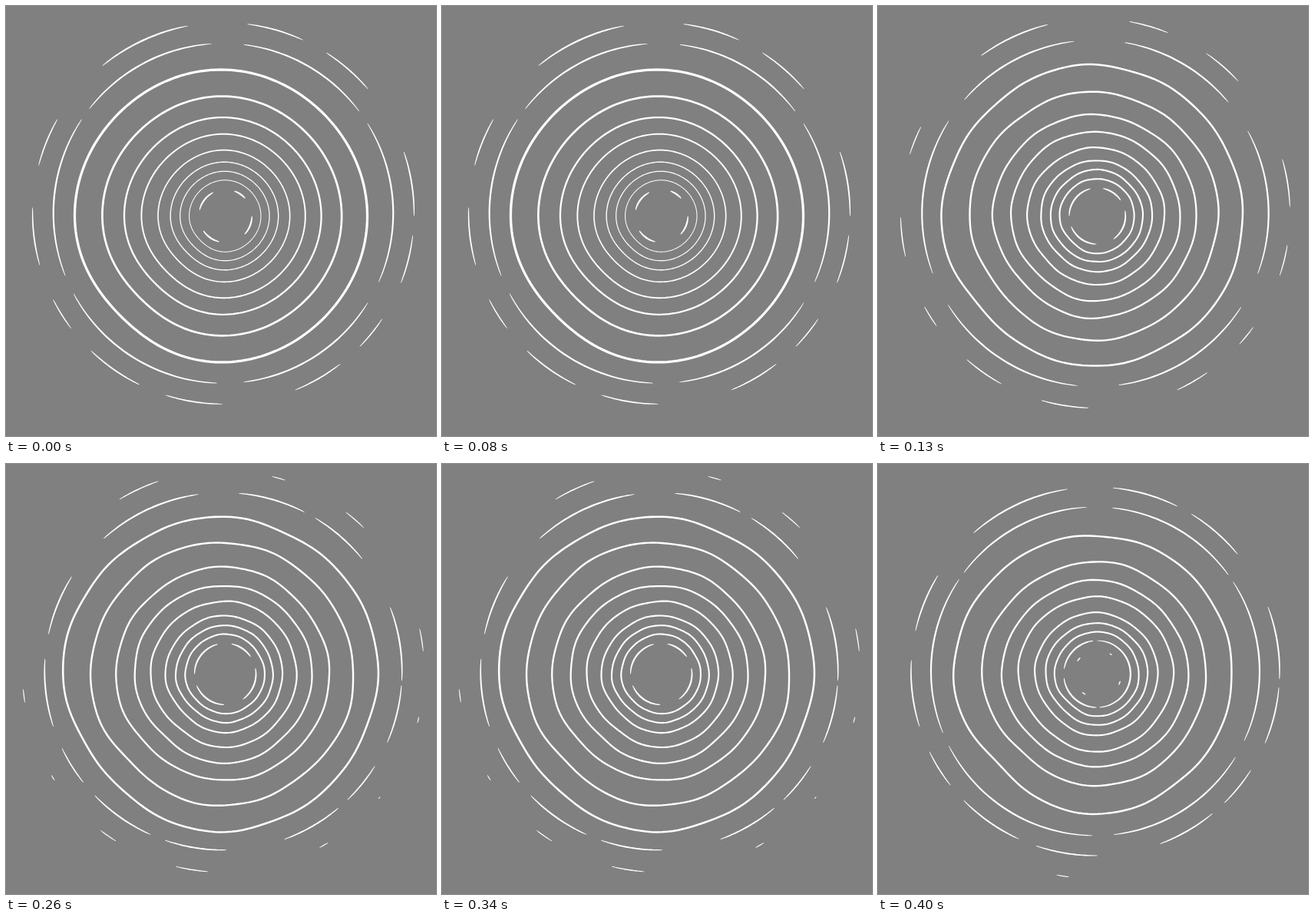
An HTML page with a canvas for the animation above (530 ms loop, 560 by 560 pixels).

```html
<!DOCTYPE html>
<html lang="en">
<head>
<meta charset="utf-8">
<title>Hand-drawn ripples</title>
<style>
html, body { margin: 0; height: 100%; overflow: hidden; background: #808080; }
canvas { display: block; }
</style>
</head>
<body>
<canvas id="stage" width="560" height="560"></canvas>
<script>
const ctx = document.getElementById('stage').getContext('2d');
const RAD = Math.PI / 180;

// Radius of a ripple after each whole loop; GROW is the way to the next one.
const RADII = [31, 43.5, 55, 66.5, 80, 101, 121.5, 146, 181.5, 214, 240, 270];
const GROW = [0, .28, .45, .72];

// Dashes: middle angle, half length (degrees), life (steps).
const BORN = [[218, 38], [304, 22], [22, 33], [125, 33]];
const JOINED = [[226, 37], [358, 88], [132, 41]];
const CRACKED = [[242, 25, 5], [300, 24, 5], [356, 29, 5], [57.5, 26, 9], [122, 31, 5], [186, 28, 8]];
const SPLIT = [
  [245, 17, 5], [286, 11, 4.4], [311, 10, 4.9], [351, 12, 4.7],
  [14, 9.5, 4.2], [39, 7, 4.1], [60, 10, 4.3], [99, 10, 5.5],
  [125, 11, 4.6], [148, 6.5, 4.3], [173, 11, 4.4], [202, 10, 4]
];

function random(seed) {
  const v = Math.sin(seed * 12.9898) * 43758.5453;
  return v - Math.floor(v);
}

function center(r) {
  return r > 210 ? [283, 270] : [287 - .037 * r, 273.5];
}

// A closed line: squarish diagonals, a flat lower left and a hand wobble.
function ring(r, step, seed) {
  const [x, y] = center(r), smooth = step === 1;
  const dip = smooth ? .022 : step ? .027 : .042;
  ctx.beginPath();
  for (let deg = 0; deg < 360; deg += 2) {
    const a = deg * RAD;
    let d = 1 - .01 * Math.sin(2 * a) ** 2 - dip * Math.exp(-(((deg - 135) / 24) ** 2));
    if (!smooth) {
      for (const k of [3, 5, 8, 13]) d += .008 / Math.sqrt(k) * Math.sin(k * a + 6.28 * random(seed + k));
    }
    ctx.lineTo(x + r * d * Math.cos(a), y + r * d * Math.sin(a));
  }
  ctx.closePath();
  ctx.lineWidth = smooth ? .3 + r / 65 : 1.9 + .003 * r;
  ctx.stroke();
}

// A part of a circle that tapers towards both ends.
function dash(r, mid, half) {
  const [x, y] = center(r), width = Math.min(2.1, 1 + half / 12), edge = [];
  for (let i = 0; i <= 30; i++) {
    const a = (mid + half * (i / 15 - 1)) * RAD;
    const h = width * (.15 + .38 * Math.sqrt(Math.sin(Math.PI * Math.min(i / 30, 1 - i / 30))));
    const at = d => [x + d * Math.cos(a), y + d * Math.sin(a)];
    edge.push(at(r + h));
    edge.unshift(at(r - h));
  }
  ctx.beginPath();
  for (const p of edge) ctx.lineTo(...p);
  ctx.fill();
}

function fade(r, dashes, age) {
  for (const [mid, half, life] of dashes) {
    if (age < life) dash(r, mid, half * (1 - (age / life) ** 2));
  }
}

// Each ripple is born in pieces, closes, cracks in six, splits and vanishes.
function ripple(age) {
  const loop = Math.floor(age / 4), step = age % 4;
  const from = RADII[loop], to = RADII[loop + 1] ?? from;
  const r = from + (to - from) * GROW[step];
  if (age < 4) {
    for (const [mid, half] of BORN) dash(r, mid, half * Math.min(1, (age + .3) / 2));
  } else if (age === 4) {
    for (const [mid, half] of JOINED) dash(r, mid, half);
  } else if (age < 36) {
    ring(r, step, age);
  } else if (age < 39) {
    fade(r, CRACKED, age - 36);
  } else {
    fade(r, SPLIT, age - 39);
  }
}

function tick() {
  const t = performance.now() % 530;
  const step = t < 130 ? 1 : t < 260 ? 2 : t < 400 ? 3 : 0;
  ctx.fillStyle = '#808080';
  ctx.fillRect(0, 0, 560, 560);
  ctx.fillStyle = ctx.strokeStyle = '#fff';
  for (let age = step; age <= 44; age += 4) ripple(age);
  requestAnimationFrame(tick);
}
tick();
</script>
</body>
</html>
```
